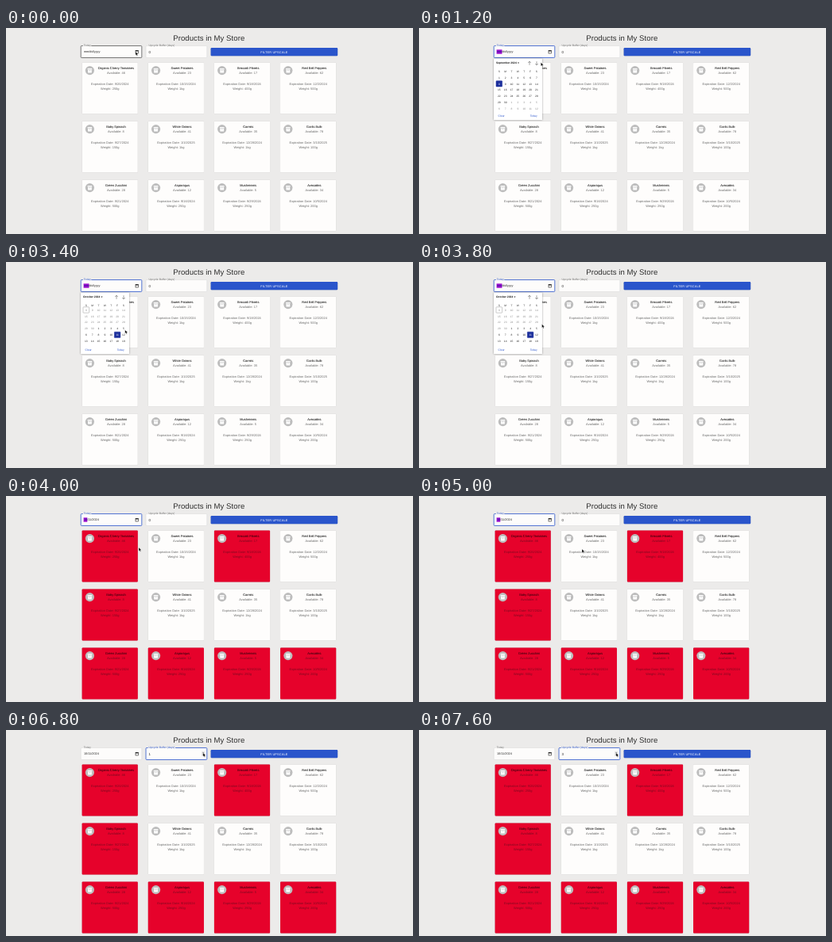
Write an HTML page that moves like this. It is 512 px wide and 260 px high and loops after 8000 ms.

```html
<!DOCTYPE html>
<html lang="en">
<head>
<meta charset="utf-8">
<title>Products in My Store</title>
<style>
  html, body { margin: 0; width: 100%; height: 100%; overflow: hidden; background: #ecebea; }
  svg { display: block; width: 100vw; height: 100vh; }
  text { font-family: "Liberation Sans", Arial, sans-serif; text-rendering: geometricPrecision; white-space: pre; }
  .card { filter: drop-shadow(0 .5px .6px rgba(0, 0, 0, .25)); }
  .popup { filter: drop-shadow(0 .8px 1.3px rgba(0, 0, 0, .4)); }
</style>
</head>
<body>
<svg id="stage" viewBox="0 0 512 260"></svg>
<script>
const LOOP = 8000, STEP = 200;
const BLUE = '#2a55cb', INK = '#222', GREY = '#666';
const stage = document.getElementById('stage');

// name, available, expiry, weight
const products = [
  ['Organic Cherry Tomatoes', 46, '9/20/2024', '250g'],
  ['Sweet Potatoes', 23, '10/15/2024', '1kg'],
  ['Broccoli Florets', 17, '9/18/2024', '400g'],
  ['Red Bell Peppers', 62, '12/2/2024', '500g'],
  ['Baby Spinach', 8, '9/27/2024', '150g'],
  ['White Onions', 41, '1/10/2025', '1kg'],
  ['Carrots', 35, '12/28/2024', '1kg'],
  ['Garlic Bulb', 78, '3/10/2025', '100g'],
  ['Green Zucchini', 28, '9/21/2024', '500g'],
  ['Asparagus', 12, '9/16/2024', '250g'],
  ['Mushrooms', 5, '9/29/2024', '250g'],
  ['Avocados', 34, '10/5/2024', '200g'],
];
const chosenDay = new Date('10/11/2024');

// time, x, y of the pointer tip
const pointerPath = [
  [0, 163, 30], [400, 163, 30], [1200, 153.3, 43.5], [1400, 153.3, 43.5],
  [2600, 140, 100], [3800, 154.6, 78.5], [4000, 167, 65], [5000, 205, 67],
  [5800, 249, 49.5], [6200, 248, 29], [LOOP, 248, 29],
];

function pointerAt(t) {
  const i = pointerPath.findIndex(p => p[0] > t);
  const [t0, x0, y0] = pointerPath[i - 1], [t1, x1, y1] = pointerPath[i];
  const k = (t - t0) / (t1 - t0);
  return [x0 + (x1 - x0) * k, y0 + (y1 - y0) * k];
}

const rect = (x, y, w, h, fill, extra = '') =>
  `<rect x="${x}" y="${y}" width="${w}" height="${h}" fill="${fill}" ${extra}/>`;
const line = (d, color, width) =>
  `<path d="${d}" fill="none" stroke="${color}" stroke-width="${width}"/>`;
// y is the middle of the capitals
const text = (s, x, y, size, fill, anchor = 'middle', extra = '') =>
  `<text x="${x}" y="${y + size * .36}" font-size="${size}" fill="${fill}" text-anchor="${anchor}" ${extra}>${s}</text>`;

function card([name, available, expiry, weight], i, filtered) {
  const x = 95.6 + (i % 4) * 83.15, y = 43.5 + Math.floor(i / 4) * 74;
  const expired = filtered && new Date(expiry) < chosenDay;
  const soft = expired ? '#7c0a20' : GREY;
  const body = (s, dx, dy) => text(s, x + dx, y + dy, 3.93, soft, 'middle', 'letter-spacing=".042"');
  return rect(x, y, 70.2, 65, expired ? '#e6022b' : '#fefdfc', 'rx="1" class="card"') +
    `<circle cx="${x + 9.8}" cy="${y + 10.1}" r="5.6" fill="#bdbdbd"/>` +
    rect(x + 7, y + 7.4, 5.6, 1.6, '#fff', 'rx=".3"') +
    rect(x + 7.4, y + 9.4, 4.8, 3.7, '#fff', 'rx=".3"') +
    rect(x + 8.9, y + 10.1, 1.8, .6, '#bdbdbd') +
    text(name, x + 42.8, y + 7.2, 3.93, expired ? '#4d0614' : INK, 'middle', 'letter-spacing=".028" stroke="currentColor" stroke-width=".06"') +
    body('Available: ' + available, 42.8, 13) +
    body('Expiration Date: ' + expiry, 35.2, 27.5) +
    body('Weight: ' + weight, 35.2, 33.2);
}

function field(x, w, label, labelWidth, focused, hovered) {
  const color = focused ? BLUE : hovered ? '#222' : '#d0cfce';
  const width = focused ? .8 : hovered ? .6 : .4;
  const gap = x + 2.6;
  return rect(x, 22.5, w, 15, '#fdfcfb', 'rx="1"') +
    line(`M${gap} 22.5H${x + 1}q-1 0-1 1V36.5q0 1 1 1H${x + w - 1}q1 0 1-1V23.5q0-1-1-1H${gap + labelWidth + 1.5}`, color, width) +
    text(label, x + 3.6, 22, 3.37, focused ? BLUE : GREY, 'start', 'letter-spacing=".032"');
}

function dateField(t, focused, hovered) {
  const value = t < 4000 ? 'mm/dd/yyyy' : '10/11/2024';
  const marked = t < 4000 ? 6.9 : 4.7;
  const content = focused
    ? rect(97.6, 27.3, marked, 5.4, '#a012d0') + text(`<tspan fill="#1c1590">${value.slice(0, 2)}</tspan>${value.slice(2)}`, 97.9, 30, 3.85, INK, 'start')
    : text(value, 97.9, 30, 3.85, INK, 'start');
  return field(94.2, 76.6, 'Today', 9, focused, hovered) + content +
    rect(163, 28.3, 3.4, 3.7, 'none', 'stroke="#111" stroke-width=".55"') +
    rect(163, 28.3, 3.4, 1.1, '#111');
}

function bufferField(t, focused, hovered) {
  const value = t < 6800 ? 0 : t < 7200 ? 1 : t < 7600 ? 2 : 3;
  const spinner = hovered
    ? rect(246, 26.8, 4.2, 6.4, '#e6e6e6') + '<path d="M247 29.3l1.1-1.4 1.1 1.4zM247 30.8l1.1 1.4 1.1-1.4z" fill="#555"/>'
    : '';
  return field(176, 76.8, 'Upcycle Buffer (days)', 33, focused, hovered) +
    text(value, 179.4, 30, 4.4, INK, 'start') + spinner;
}

function calendar(t) {
  const october = t >= 2800;
  const month = october ? 9 : 8;
  const firstDay = october ? 8 : 1, top = october ? 60.5 : 62.5;
  const colX = c => 100.8 + c * 7.86;
  let out = rect(94, 38.5, 61, 77.5, '#fff', 'rx=".6" class="popup"') +
    text((october ? 'October' : 'September') + ' 2024', 97, 44.2, 3.37, '#111', 'start', 'font-weight="bold"');
  const caret = october ? 119.5 : 124;
  out += `<path d="M${caret} 43.6h2l-1 1.4z" fill="#222"/>` +
    line('M139 46.8v-4.6m-1.7 1.8l1.7-1.8 1.7 1.8M148 42.2v4.6m-1.7-1.8l1.7 1.8 1.7-1.8', '#444', .5);
  [...'SMTWTFS'].forEach((d, c) => out += text(d, colX(c), 54.6, 3.3, '#333'));
  for (let i = 0; i < 42; i++) {
    const date = new Date(2024, 8, firstDay + i), day = date.getDate();
    const x = colX(i % 7), y = top + Math.floor(i / 7) * 7.85;
    const inMonth = date.getMonth() === month;
    const today = date.getMonth() === 8 && day === 8;
    const target = date.getMonth() === 9 && day === 11;
    const selected = october ? target : today;
    const cell = (fill, stroke) => rect(x - 3.8, y - 3.7, 7.6, 7.4, fill, `rx=".6" stroke="${stroke}" stroke-width=".5"`);
    if (selected) out += cell('#1c2f9c', '#1c2f9c');
    else if (today) out += cell('#fff', '#999');
    else if (target && t >= 2600) out += cell('#b4bff0', '#2f4fc6');
    out += text(day, x, y, 3.3, selected ? '#fff' : inMonth ? '#222' : '#8a8a8a');
  }
  return out + text('Clear', 99.6, 110.6, 3.37, BLUE, 'start') + text('Today', 148.6, 110.6, 3.37, BLUE, 'end');
}

function scene(t) {
  const [px, py] = pointerAt(t);
  const over = (x0, x1) => px > x0 && px < x1 && py > 22 && py < 37.5;
  const dateFocused = t >= 200 && t < 6800;
  return rect(0, 0, 512, 260, '#ecebea') +
    text('Products in My Store', 255.3, 12.8, 9.55, '#2c2c2c', 'middle', 'letter-spacing=".07"') +
    products.map((p, i) => card(p, i, t >= 4000)).join('') +
    dateField(t, dateFocused, over(94, 171)) +
    bufferField(t, t >= 6800, over(176, 253)) +
    rect(257.6, 25.1, 159.6, 10.2, BLUE, 'rx="1.1" class="card"') +
    text('FILTER UPSCALE', 337.4, 30.1, 3.93, '#fff', 'middle', 'letter-spacing=".112"') +
    (t >= 400 && t < 4000 ? calendar(t) : '') +
    `<path transform="translate(${px} ${py})" d="M0 0V4.6L1.1 3.6 1.8 5.3 2.6 5 1.9 3.3H3.3Z" fill="#000" stroke="#fff" stroke-width=".3"/>`;
}

let shown = -1;
function tick(now) {
  const step = Math.floor((now % LOOP) / STEP);
  if (step !== shown) stage.innerHTML = scene((shown = step) * STEP);
  requestAnimationFrame(tick);
}
tick(performance.now());
</script>
</body>
</html>
```
